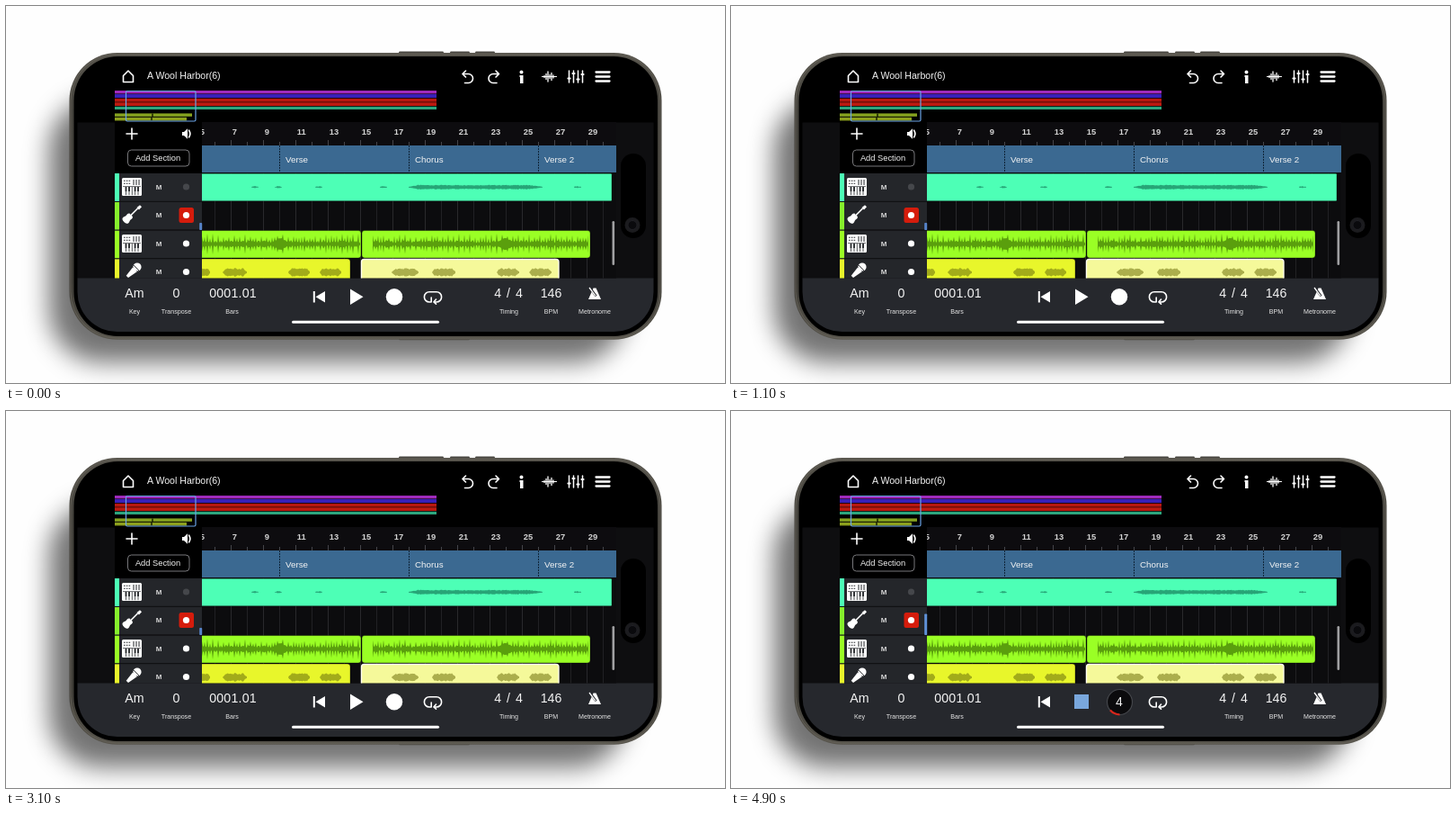
Write an HTML page that moves like this. It is 800 px wide and 419 px high and loops after 5 s.

```html
<!DOCTYPE html>
<html lang="en">
<head>
<meta charset="utf-8">
<title>Music studio on a phone</title>
<style>
html, body { margin: 0; width: 100%; height: 100%; overflow: hidden; background: #fefefe; }
svg { display: block; width: 100%; height: 100%; }
text { font-family: "Liberation Sans", Arial, sans-serif; fill: #f4f4f4; }
.mid { text-anchor: middle; }
.title { font-size: 10.6px; }
.bar-no { font-size: 9.4px; font-weight: bold; fill: #d4d4d4; }
.part { font-size: 9.8px; }
.value { font-size: 14.2px; }
.label { font-size: 7.1px; fill: #e6e6e6; }
.mute { font-size: 8px; font-weight: bold; fill: #d8d8d8; }
.line { fill: none; stroke: #fff; stroke-width: 1.6; stroke-linecap: round; stroke-linejoin: round; }
.white { fill: #fff; }
.clip { stroke: #000; stroke-opacity: .45; stroke-width: .8; }
.idle { animation: idle 5s step-end infinite; }
.count { animation: count 5s step-end infinite; }
@keyframes idle { 0% { opacity: 1 } 98%, 100% { opacity: 0 } }
@keyframes count { 0% { opacity: 0 } 98%, 100% { opacity: 1 } }
</style>
</head>
<body>
<svg viewBox="0 0 800 419" preserveAspectRatio="none">
  <defs>
    <filter id="soft" x="-20%" y="-25%" width="140%" height="160%"><feGaussianBlur stdDeviation="14"/></filter>
    <linearGradient id="frame" x2="0" y2="1">
      <stop offset="0" stop-color="#57544c"/><stop offset=".2" stop-color="#45433d"/>
      <stop offset=".8" stop-color="#3f3d37"/><stop offset="1" stop-color="#57544c"/>
    </linearGradient>
    <clipPath id="screen"><rect x="79.500" y="60" width="641" height="302" rx="44"/></clipPath>
    <clipPath id="lanes"><rect x="218" y="129" width="461" height="173.500"/></clipPath>
    <clipPath id="heads"><rect x="121" y="129" width="97" height="173.500"/></clipPath>
    <g id="synth">
      <rect width="22" height="20" rx="1.500" class="white"/>
      <path d="M2 3.200h8M2 6.200h8" stroke="#24262a" stroke-width="1.100" stroke-dasharray="1.600 1.200"/>
      <path d="M13 2v6M16 2v6M19 2v6" stroke="#24262a"/>
      <path d="M4.500 10v9.200M8 10v9.200M11.300 10v9.200M14.600 10v9.200M18 10v9.200" stroke="#24262a" stroke-width=".8"/>
      <path d="M4.500 10v5M8 10v5M14.600 10v5M18 10v5" stroke="#24262a" stroke-width="1.800"/>
      <path d="M1 9.600h20" stroke="#24262a" stroke-width=".7"/>
    </g>
  </defs>

  <rect width="800" height="419" fill="#fefefe"/>
  <rect x="48" y="102" width="642" height="294" rx="58" fill="#000" opacity=".55" filter="url(#soft)"/>

  <!-- Phone body -->
  <g fill="#4a4842">
    <rect x="437" y="50.500" width="50" height="4" rx="1.200"/>
    <rect x="494" y="50.500" width="22" height="4" rx="1.200"/>
    <rect x="522" y="50.500" width="22" height="4" rx="1.200"/>
    <rect x="437" y="367.500" width="79" height="3.800" rx="1.200"/>
  </g>
  <rect x="70.500" y="52" width="659" height="318.800" rx="53" fill="url(#frame)"/>
  <rect x="72" y="53.500" width="656" height="315.800" rx="51.500" fill="none" stroke="#67645b" stroke-width=".8"/>
  <rect x="75.500" y="56" width="649.500" height="311" rx="49" fill="#000"/>

  <g clip-path="url(#screen)">
    <rect x="79" y="129.500" width="642" height="174" fill="#0e0e10"/>
    <rect x="79" y="302.500" width="642" height="60" fill="#26282d"/>
  </g>
  <rect x="684" y="164" width="28" height="94" rx="14" fill="#000"/>
  <circle cx="697" cy="243.500" r="8.500" fill="#1b1b1e"/>
  <circle cx="697" cy="243.500" r="5" fill="#0a0a0d" stroke="#212126"/>

  <!-- Header -->
  <path class="line" d="M130.500 77.500L136 72l5.500 5.500V84.500h-11z"/>
  <text class="title" x="157" y="81">A Wool Harbor(6)</text>
  <g class="line">
    <path d="M511.500 72l-3.500 3.500 3.500 3.500M508.500 75.500h6a5 5 0 0 1 0 10h-4"/>
    <path d="M545 72l3.500 3.500-3.500 3.500M548 75.500h-6a5 5 0 0 0 0 10h4"/>
    <path d="M596.500 78.500h16" stroke-width="1.200"/>
    <path d="M599 77.500v2M601 75.500v6M603 73v11M605 76.500v4M607 74.500v8M609 77v3" stroke-width="1.300"/>
    <path d="M626.500 72v13M631.500 72v13M636.500 72v13M641.500 72v13" stroke-width="1.500"/>
    <path d="M625.500 80.500h2M630.500 75h2M635.500 81.500h2M640.500 76h2" stroke-width="2.200"/>
    <path d="M656.500 73.500h15M656.500 78.500h15M656.500 83.500h15" stroke-width="2.300"/>
  </g>
  <circle cx="573.500" cy="73.500" r="2" class="white"/>
  <path d="M571.500 77h4v9h-3.500v-7h-.5z" class="white"/>

  <!-- Song overview -->
  <g id="overview"></g>
  <path d="M163 119.500v3.500M162 124v3.500" stroke="#182000" stroke-width="1.500"/>
  <rect x="133.500" y="94.500" width="77.500" height="33.500" rx="1.500" fill="none" stroke="#6aa4e6" stroke-width="1.200"/>

  <!-- Timeline -->
  <g clip-path="url(#lanes)">
    <rect x="218" y="129" width="461" height="26" fill="#0d0c0f"/>
    <rect x="218" y="186" width="461" height="117" fill="#0c0c0e"/>
    <g id="grid"></g>
    <rect x="218" y="155" width="461" height="30" fill="#3b6991"/>
    <g id="parts"></g>
    <rect class="clip" x="210" y="186.200" width="464" height="30.500" rx="1" fill="#4dffb6"/>
    <rect class="clip" x="210" y="249.500" width="185" height="30.500" rx="3" fill="#9aff25"/>
    <rect class="clip" x="396" y="249.500" width="254" height="30.500" rx="3" fill="#9aff25"/>
    <rect class="clip" x="210" y="281" width="173" height="30" rx="3" fill="#e8f62b"/>
    <rect x="395.500" y="281.500" width="219.500" height="30" rx="3" fill="#f5f99a" stroke="#fffef0" stroke-width="1.300"/>
    <g id="waves"></g>
    <rect x="674.500" y="239" width="2.600" height="49" rx="1.300" fill="#a0a0a2"/>
  </g>

  <!-- Track heads -->
  <g clip-path="url(#heads)">
    <rect x="121" y="129" width="97" height="57" fill="#000"/>
    <rect x="121" y="186" width="97" height="117" fill="#24262a"/>
    <path d="M121 217.300h97M121 249h97M121 280.700h97" stroke="#101113" stroke-width="1.300"/>
    <rect x="121" y="186" width="5" height="31" fill="#4dffb6"/>
    <rect x="121" y="218" width="5" height="30.500" fill="#86f02c"/>
    <rect x="121" y="249.700" width="5" height="30.500" fill="#9aff25"/>
    <rect x="121" y="281.400" width="5" height="22" fill="#e8f62b"/>
    <use href="#synth" x="129" y="191"/>
    <use href="#synth" x="129" y="254"/>
    <g class="white">
      <path d="M129.500 236c1-2 3.500-2 4.500-3.500s2.500-2.500 4-1.500l1 1.500 1.500 1c1 1.500 0 3-1.500 3.700s-1.500 3-3 4.300c-2 1.500-7-2.500-6.500-5.500z"/>
      <path d="M138 233.500l8.500-8.500" stroke="#fff" stroke-width="1.700"/>
      <path d="M145.500 224l3.500-2.800 2 2-3 3.300z"/>
      <circle cx="146" cy="290" r="4.600"/>
      <path d="M141 290.500l4.800 4.800-9.800 6.700-2.300-2.200z"/>
    </g>
    <path d="M142 288l6 6" stroke="#24262a" stroke-width=".9"/>
    <rect x="192.500" y="224" width="16.500" height="17" rx="2.500" fill="#d51c0c"/>
    <g id="heads-marks"></g>
    <path class="line" d="M134 142h12M140 136v12" stroke-width="1.700"/>
    <path class="white" d="M196 140h2l4-3.700v11.400l-4-3.700h-2z"/>
    <path class="line" d="M203.600 138.200q2.600 3.800 0 7.600" stroke-width="1"/>
    <rect x="135.500" y="160" width="68.500" height="18" rx="4" fill="#000" stroke="#77777a"/>
    <text class="mid" x="169" y="172.300" font-size="9.300">Add Section</text>
  </g>
  <rect class="idle" x="215.200" y="241" width="3" height="8" rx=".8" fill="#5683c9"/>
  <rect class="count" x="215.200" y="225.500" width="3" height="23.500" rx=".8" fill="#5f91d8"/>

  <!-- Transport -->
  <g id="readouts"></g>
  <path class="white" d="M341.800 317h2v12.500h-2zM355 317v12.500l-10.500-6.250z"/>
  <g class="idle">
    <path class="white" d="M383 314.500l14.500 8.700-14.500 8.700z"/>
    <circle class="white" cx="432" cy="323.300" r="9.200"/>
  </g>
  <g class="count">
    <rect x="382" y="315" width="16" height="16" fill="#79a7dc"/>
    <circle cx="432.500" cy="323.500" r="14" fill="#0b0b0d" stroke="#45474c" stroke-width="1.200"/>
    <path d="M432.500 337.300a14 14 0 0 1-10.500-4.800" fill="none" stroke="#d8261c" stroke-width="2.200"/>
    <text class="mid" x="432" y="328.300" font-size="14">4</text>
  </g>
  <path class="line" d="M473.200 324v5h-2.200a5.600 5.600 0 0 1 0-11.200h8a5.600 5.600 0 0 1 0 11.200h-2.500M478.500 326l-2.600 3 2.600 2.200" stroke-width="2"/>
  <path class="white" d="M653.500 313.500h3l5.500 12.500h-14z"/>
  <path d="M650 313.500l6.500 9" stroke="#26282d" stroke-width="2.600"/>
  <path d="M649 313l7 9.300" stroke="#fff" stroke-width="1.300"/>
  <rect x="318" y="349.700" width="164" height="3" rx="1.500" class="white"/>
</svg>
<script>
const NS = "http://www.w3.org/2000/svg";
const byId = id => document.getElementById(id);

function add(parent, tag, attrs, text) {
  const el = document.createElementNS(NS, tag);
  for (const key in attrs) el.setAttribute(key, attrs[key]);
  if (text) el.textContent = text;
  byId(parent).append(el);
}

const noise = n => {
  const v = Math.sin(n * 12.9898) * 43758.5453;
  return v - Math.floor(v);
};

// Mirrored outline around a centre line; height(t, i) gives half the thickness.
function wave(x0, x1, cy, fill, height) {
  const top = [], low = [];
  for (let x = x0, i = 0; x <= x1; x++, i++) {
    const h = height((x - x0) / (x1 - x0), i);
    top.push(`${x} ${(cy - h).toFixed(2)}`);
    low.unshift(`${x} ${(cy + h).toFixed(2)}`);
  }
  add("waves", "path", { d: `M${top.concat(low).join("L")}z`, fill });
}

// Overview strips
[[94, 3.4, 479, "#a02abc"], [98, 4, 479, "#3820b8"], [102.8, 3.8, 479, "#b8180f"],
 [107.2, 3.8, 479, "#bc1a10"], [111.8, 3.2, 479, "#2da67d"],
 [119.4, 3.4, 207, "#86a31f"], [123.8, 3.6, 201, "#8ca01d"]].forEach(([y, height, end, fill]) =>
  add("overview", "rect", { x: 121, y, width: end - 121, height, fill }));

// Bars
for (let bar = 5; bar <= 30; bar++) {
  const x = 214.5 + (bar - 5) * 18;
  add("grid", "path", { d: `M${x} 186V303`, stroke: bar % 2 ? "#29292c" : "#212124" });
  add("grid", "path", { d: `M${x} ${bar % 2 ? 149 : 151}V155`, stroke: "#55555a", "stroke-width": .8 });
  if (bar % 2) add("grid", "text", { x: x + 1.3, y: 143.3, class: "bar-no" }, String(bar));
}

["Verse", "Chorus", "Verse 2"].forEach((name, i) => {
  const x = 304.5 + i * 144;
  add("parts", "path", { d: `M${x} 155V185`, stroke: "#0f2438", "stroke-dasharray": "2 1" });
  add("parts", "text", { x: x + 6.5, y: 173.6, class: "part" }, name);
});

// Pad track
const pad = "#27a577";
[273, 299, 344, 416, 632].forEach(x =>
  wave(x, x + 8, 201.3, pad, (t, i) => .3 + 1.2 * Math.sin(Math.PI * t) * noise(i + x)));
wave(448, 597, 201.3, pad, (t, i) => .4 + 2.2 * Math.min(1, t * 14, (1 - t) * 10) * (.6 + .4 * noise(i)));

// Rhythm track
function rhythm(x0, x1, swell, seed) {
  wave(x0, x1, 264.5, "#5a9f0d", (t, i) => {
    const x = x0 + i;
    const hit = i % 6 === 0 ? 7 + 5 * noise(i + seed) : i % 3 === 0 ? 3 + 5 * noise(i * 3 + seed) : 0;
    const bulge = 6 * Math.exp(-(((x - swell) / 7) ** 2));
    return Math.min(13.5, Math.max(hit, 1.2 + 2.6 * noise(i * 7 + seed), bulge + noise(i)));
  });
}
rhythm(218, 394, 305, 4);
rhythm(408, 648, 556, 9);

// Vocal track
function phrase(x0, x1, fill) {
  wave(x0, x1, 296, fill, (t, i) =>
    Math.min(1, t * 9, (1 - t) * 6 + .2) * (2.8 + 1.9 * noise(i + x0)));
}
[[216, 227], [241, 268], [314, 338], [349, 373]].forEach(([a, b]) => phrase(a, b, "#a2ab1a"));
[[429, 459], [474, 500], [546, 571], [582, 607]].forEach(([a, b]) => phrase(a, b, "#abae4c"));

// Mute letters and record dots
[201, 232.5, 264, 295.5].forEach((y, i) => {
  add("heads-marks", "text", { x: 170, y: y + 2.9, class: "mute mid" }, "M");
  add("heads-marks", "circle", { cx: 200.5, cy: y, r: 3.6, fill: i ? "#fff" : "#45474b" });
});

// Readouts
[[143, "Am", "Key"], [189.5, "0", "Transpose"], [252.5, "0001.01", "Bars"],
 [559.5, "4 / 4", "Timing"], [606.5, "146", "BPM"], [655, "", "Metronome"]].forEach(([x, value, label]) => {
  const spread = label === "Timing" ? 1 : label === "Bars" ? .2 : 0;
  if (value) add("readouts", "text", { x, y: 323.8, class: "value mid", "letter-spacing": spread }, value);
  add("readouts", "text", { x: label === "Bars" ? 251.5 : x, y: 341.8, class: "label mid" }, label);
});
</script>
</body>
</html>
```
